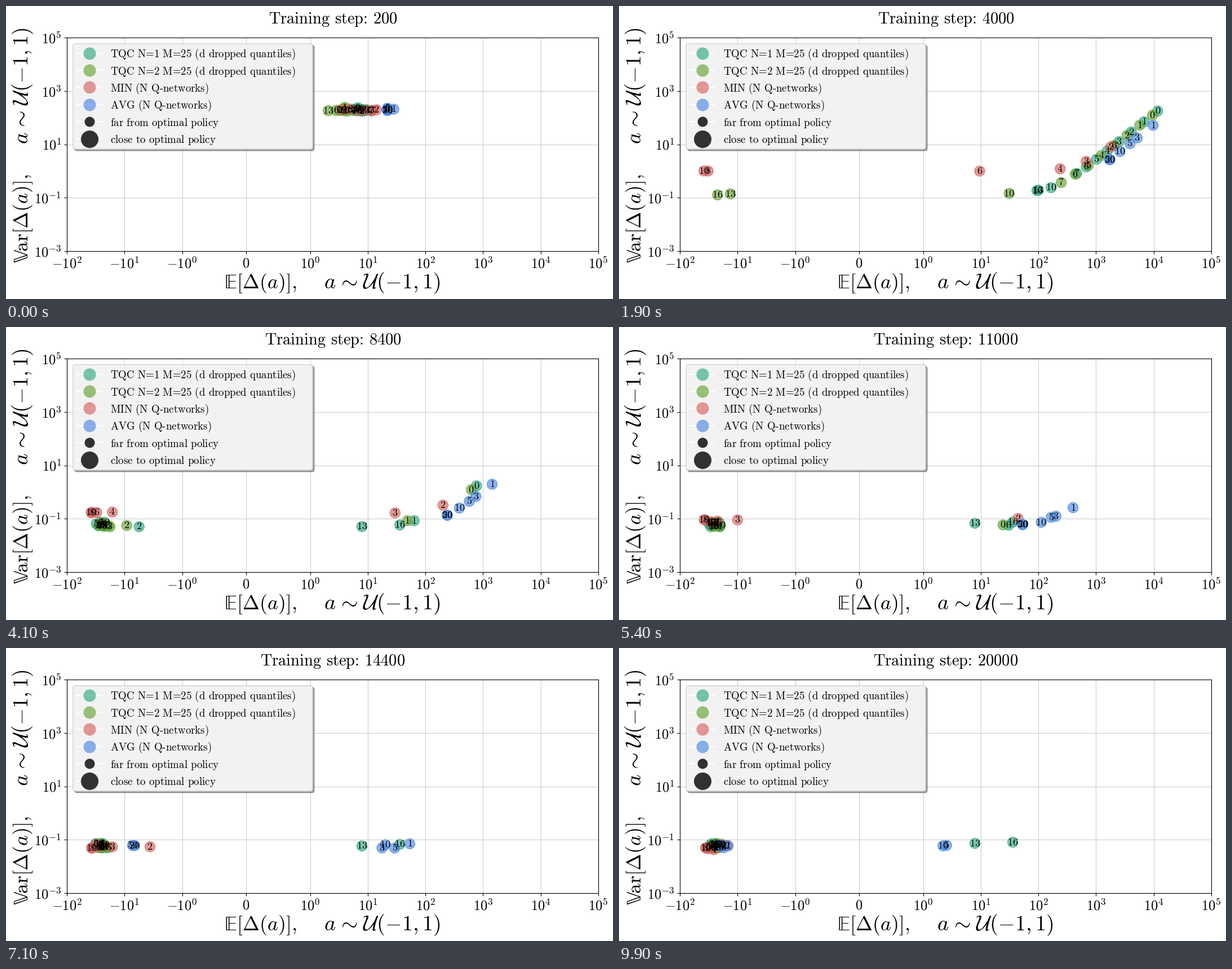
These frames come from a looping animation (1077 by 520 pixels, 10000 ms). A matplotlib script:

```python
import numpy as np
import matplotlib.pyplot as plt
from matplotlib.animation import FuncAnimation
from matplotlib.lines import Line2D
from matplotlib.patches import FancyBboxPatch

W, H, DPI = 1077, 520, 100
FRAMES, INTERVAL = 100, 100
ALPHA = 0.63
TEAL, GREEN, RED, BLUE = "#2aa580", "#62a030", "#d55f5d", "#4886e1"
BURST = 0.9   # seconds of the opening spread
PIVOT = 1.9   # moment at which the level of a point is given
SHIFT = 60    # keeps log(bias + SHIFT) defined on the negative side

plt.rcParams["mathtext.fontset"] = "cm"
rng = np.random.default_rng(4)


class Dot:
    """A point whose bias decays to `rest` while its variance follows."""

    def __init__(self, name, color, level, rate, rest, start,
                 bend=0.0, gain=-4.75, floor=0.06, extra=0.07, fade=3.0):
        self.name, self.color = name, color
        self.level, self.rate, self.bend = level, rate, bend
        self.rest = rest * rng.uniform(0.75, 1.25) if rest < 0 else rest
        self.start = 10 ** start
        self.gain, self.floor = gain, floor
        self.extra, self.fade = extra, fade
        self.start_var = 2.3 + rng.normal(0, 0.04)
        self.phase = rng.uniform(0, 2 * np.pi)

    def at(self, t):
        s = t - PIVOT
        drop = self.rate * s + self.bend * s * s if s > 0 else 0.3 * s
        sway = np.sin(2 * t + self.phase)
        rest = self.rest * (1 + 0.06 * sway) if self.rest < 0 else self.rest
        bias = rest + 10 ** (self.level - drop)

        var = self.floor * 10 ** (0.08 * np.cos(1.6 * t + self.phase))
        var += self.extra * np.exp(-self.fade * s)
        var += 10 ** self.gain * max(bias, 0) ** 1.72

        w = 1 - (1 - min(t / BURST, 1)) ** 2
        x = (1 - w) * np.log(self.start + SHIFT) + w * np.log(bias + SHIFT)
        y = (1 - w) * self.start_var + w * np.log10(var)
        return np.exp(x) - SHIFT, 10 ** y


def make_dots():
    dropped = [*range(8), 10, 13, 16]
    dots = []
    for d in dropped:
        dots.append(Dot(d, TEAL, 4.07 - 0.24 * d + 0.006 * d * d,
                        0.3 + 0.33 * d ** 0.7, max(-25, 9.3 * d - 113),
                        rng.normal(0.87, 0.07), bend=0.105))
    for d in dropped:
        dots.append(Dot(d, GREEN, 3.98 - 0.22 * d, 0.3 + 0.33 * d ** 0.7,
                        -25, rng.normal(0.65, 0.2), bend=0.105))
    for n in (2, 3, 4, 6, 8, 10):
        dots.append(Dot(n, RED, 4.1 - 0.42 * n, 0.2 + 0.11 * n,
                        -17 - 2 * n, 1.3 - 0.075 * n,
                        floor=0.05, extra=0.95, fade=0.95))
    for n in (1, 3, 5, 10, 20, 50):
        dots.append(Dot(n, BLUE, 3.99 - 0.25 * np.log(min(n, 20)), 0.35,
                        1.5 if 3 < n < 20 else -20, 1.34 + 0.11 * (n == 1),
                        bend=0.012, gain=-5.15, floor=0.055, extra=0.01))
    return dots


def pt(px):
    return px * 72 / DPI


def roman(text):
    return rf"$\text{{{text}}}$"


def power(value):
    if value == 0:
        return "$0$"
    sign = "-" if value < 0 else ""
    return rf"${sign}10^{{{round(np.log10(abs(value)))}}}$"


fig = plt.figure(figsize=(W / DPI, H / DPI), dpi=DPI, facecolor="white")
ax = fig.add_axes([108 / W, 1 - 435 / H, 943 / W, 379 / H])
ax.set_xscale("symlog", linthresh=1)
ax.set_yscale("log")
xticks = [-100, -10, -1, 0] + [10.0 ** k for k in range(6)]
yticks = [10.0 ** k for k in range(-3, 6, 2)]
ax.set_xticks(xticks, [power(v) for v in xticks], fontsize=17.5)
ax.set_yticks(yticks, [power(v) for v in yticks], fontsize=17.5)
ax.minorticks_off()
ax.grid(True, color="#b0b0b0", lw=0.8, alpha=0.6)

# Stage overlay in pixels, y pointing down
top = fig.add_axes([0, 0, 1, 1], zorder=5)
top.set_xlim(0, W)
top.set_ylim(H, 0)
top.axis("off")


def label(x, y, text, size, **kw):
    return top.text(x, y, text, fontsize=size, va="baseline",
                    rotation_mode="anchor", **kw)


title = label(580, 31, "", 20.5, ha="center")
action = r"$a\hspace{0.1}\sim\hspace{0.1}\mathcal{U}(-1,1)$"
label(387, 501, r"$\mathrm{\mathbb{E}}[\Delta(a)],$", 25.9)
label(564, 501, action, 27.5)
label(39, 456, r"$\mathrm{\mathbb{V}ar}[\Delta(a)],$", 25.7, rotation=90)
label(39, 245, action, 27.5, rotation=90)


def box(offset, **kw):
    style = "round,pad=0,rounding_size=4"
    top.add_patch(FancyBboxPatch((119 + offset, 67 + offset), 425, 187,
                                 boxstyle=style, lw=1, **kw))


box(2.8, fc="#484848", ec="#484848", alpha=0.5)
box(0, fc="#f7f7f7", ec="#cccccc", alpha=0.95)
LEGEND = [
    ("TQC N=1 M=25 (d dropped quantiles)", TEAL, 23),
    ("TQC N=2 M=25 (d dropped quantiles)", GREEN, 23),
    ("MIN (N Q-networks)", RED, 23),
    ("AVG (N Q-networks)", BLUE, 23),
    ("far from optimal policy", "black", 19),
    ("close to optimal policy", "black", 32),
]
for row, (text, color, size) in enumerate(LEGEND):
    y = 83.5 + 30.4 * row
    alpha = 0.8 if color == "black" else ALPHA
    top.add_line(Line2D([126, 169], [y, y], color="white", lw=1.5))
    top.add_line(Line2D([147.5], [y], marker="o", ms=pt(size), mfc=color,
                        mec="white", mew=0.8, ls="none", alpha=alpha))
    label(185, y + 7.5, roman(text), 13.6)

dots = make_dots()
start = np.array([dot.at(0) for dot in dots])
marks = ax.scatter(start[:, 0], start[:, 1], s=pt(18.2) ** 2, lw=1,
                   c=[dot.color for dot in dots], alpha=ALPHA)
tags = [ax.text(0, 1, f"${dot.name}$", fontsize=13.2, ha="center",
                va="center") for dot in dots]
ax.set_xlim(-1e2, 1e5)
ax.set_ylim(1e-3, 1e5)


def update(frame):
    place = [dot.at(frame * INTERVAL / 1000) for dot in dots]
    marks.set_offsets(place)
    for tag, xy in zip(tags, place):
        tag.set_position(xy)
    title.set_text(roman(f"Training step: {200 * (frame + 1)}"))
    return [marks, title, *tags]


anim = FuncAnimation(fig, update, frames=FRAMES, interval=INTERVAL,
                     repeat=True, repeat_delay=0, blit=False)
plt.show()
```
